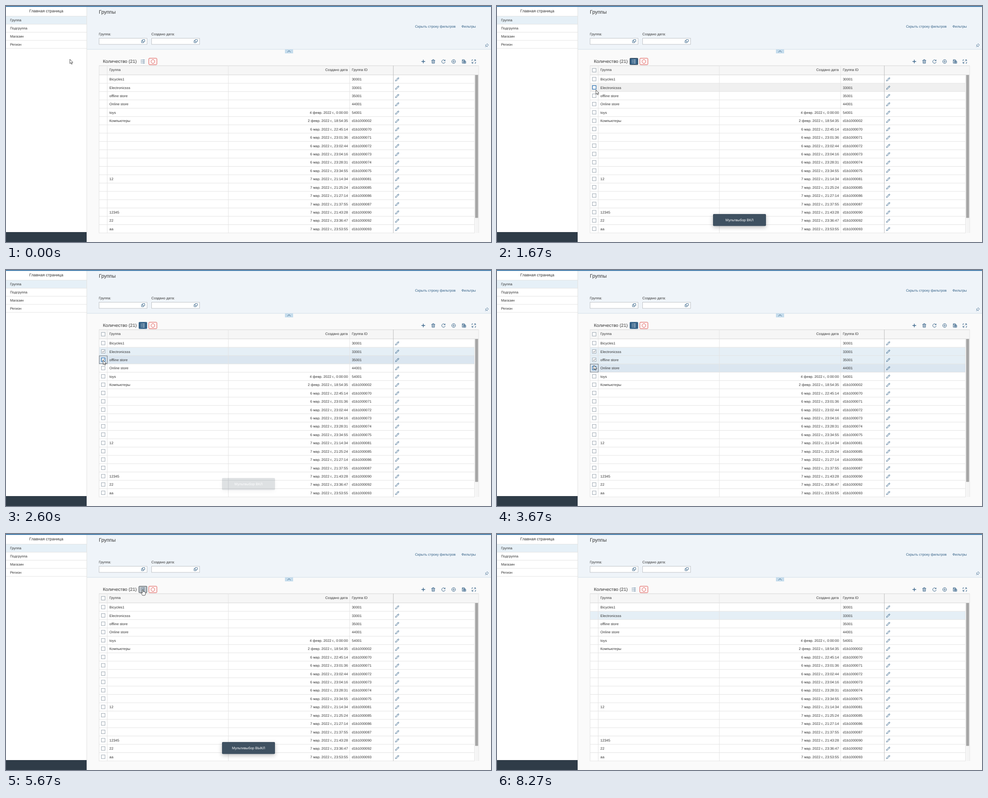
An HTML page that plays this animation: 1071 px wide and 523 px high, repeating every 8470 ms.

```html
<!DOCTYPE html>
<html lang="ru">
<head>
<meta charset="utf-8">
<title>Группы</title>
<style>
html, body { margin: 0; width: 100%; height: 100%; overflow: hidden; background: #fafafa; }
svg { display: block; width: 1071px; height: 523px; }
text { font: 7.82px "Liberation Sans", Arial, sans-serif; fill: #333; text-rendering: geometricPrecision; white-space: pre; }
.end { text-anchor: end; }
.mid { text-anchor: middle; }
.link { fill: #346187; }
.line { stroke: #e3e3e3; fill: none; }
.icon { stroke: #346187; stroke-width: 1; fill: none; }
.box { fill: #fff; stroke: #8f9ba6; stroke-width: .9; }
.box.hot { stroke: #2a6fb0; stroke-width: 1.3; }
.tick { fill: none; stroke: #55616c; stroke-width: 1; }
</style>
</head>
<body>
<svg id="stage" viewBox="0 0 1071 523" xmlns="http://www.w3.org/2000/svg"></svg>
<script>
const LOOP = 8470, STEP = 1000 / 15;
const ROWS = 19, TOP = 153, PITCH = 18.43;

const names = ['Bicycles1', 'Electronicsss', 'offline store', 'Online store', 'toys', 'Компьютеры'];
Object.assign(names, { 12: '12', 16: '12345', 17: '22', 18: 'aa' });
const ids = ['30001', '33001', '35001', '44001', '54001',
  ...['02', '70', '71', '72', '73', '74', '75', '81', '85', '86', '87', '90', '92', '93'].map(n => 'd1b10000' + n)];
const dates = ['', '', '', '', '4 февр. 2022 г., 0:00:00', '2 февр. 2022 г., 18:54:35',
  ...['22:45:14', '23:01:36', '23:02:44', '23:04:16', '23:28:31', '23:34:55'].map(s => '6 мар. 2022 г., ' + s),
  ...['21:14:34', '21:25:24', '21:27:14', '21:37:55', '21:43:28', '23:36:47', '23:53:55'].map(s => '7 мар. 2022 г., ' + s)];

// time, x, y of the pointer tip
const path = [
  [0, 141, 118], [500, 302, 123], [870, 302, 123], [1250, 250, 160], [1660, 218.5, 186], [1740, 218.5, 186],
  [1930, 213.5, 184], [2200, 213.5, 184], [2440, 214.5, 200], [2870, 214.5, 200], [3070, 214, 217.5],
  [3470, 214, 217.5], [3730, 214, 210], [3810, 214, 210], [4000, 214, 202], [4200, 214, 202],
  [4440, 215, 184.5], [4800, 215, 184.5], [5330, 302, 123], [5800, 302, 123], [6260, 219, 182],
  [6810, 219, 182], [7130, 214, 238], [7450, 47, 330], [7930, 734, 512], [8000, 800, 540]
];
// time, value: row index or 'button'
const focus = [[0, null], [600, 'button'], [2060, 1], [2460, 2], [3130, 3], [4060, 2], [4530, 1],
  [5460, 'button'], [6390, 1], [8260, null]];
// row, from, until
const picks = [[1, 2130, 4730], [2, 2530, 4130], [3, 3190, 5530], [1, 6390, LOOP]];
// shown, fade start, text
const toasts = [[600, 1870, 'Мультвыбор ВКЛ'], [5530, 6290, 'Мультивыбор ВЫКЛ']];
const FADE = 1000;

const txt = (x, y, s, cls = '', size = 7.82) =>
  `<text x="${x}" y="${y}" class="${cls}" style="font-size:${size}px">${s}</text>`;
const rect = (x, y, w, h, fill, more = '') =>
  `<rect x="${x}" y="${y}" width="${w}" height="${h}" fill="${fill}" ${more}/>`;
const line = (x1, y1, x2, y2, color = '#e3e3e3') =>
  `<path d="M${x1} ${y1}L${x2} ${y2}" stroke="${color}" fill="none"/>`;
const icon = (x, y, d, more = '') => `<path class="icon" transform="translate(${x} ${y})" d="${d}" ${more}/>`;
const many = (n, f) => Array.from({ length: n }, (_, i) => f(i)).join('');
const rowY = i => TOP + i * PITCH;

function sidebar() {
  return rect(0, 0, 178, 523, '#fff') + rect(0, 22.5, 178, 17.5, '#e6f0f7') +
    txt(89, 14.2, 'Главная страница', 'mid', 8.94) + line(0, 22.5, 178, 22.5) +
    ['Группа', 'Подгруппа', 'Магазин', 'Регион'].map((s, i) =>
      txt(9, 34 + i * 18, s) + line(0, 40.3 + i * 17.9, 178, 40.3 + i * 17.9)).join('') +
    line(178.3, 2, 178.3, 523, '#e0e0e0') + rect(0, 501, 178, 22, '#2f3c48');
}

function field(x, label) {
  return txt(x, 65.4, label, '', 7.82) +
    rect(x + .5, 71.5, 106, 13.5, '#fff', 'stroke="#bfc3c7"') +
    icon(x + 98, 78, 'M-1.5-3.5H3.5V1H-1.5ZM-1.5-1.2H-3.8V3.3H1V1', 'style="stroke-width:.9"');
}

function header() {
  return rect(178.8, 0, 893, 95.5, '#eff4f9') + line(179, 96, 1071, 96, '#cfdde8') +
    txt(205, 17, 'Группы', '', 11.17) + field(205, 'Группа:') + field(321, 'Создано дата:') +
    txt(993, 47.6, 'Скрыть строку фильтров', 'link end') + txt(1037.5, 47.6, 'Фильтры', 'link end') +
    rect(616, 96, 18, 9, '#c5dcec') + icon(625, 100.5, 'M-3.5 1.8L0-1.6L3.5 1.8') +
    icon(1062, 87, 'M.5-3.5L3.5-.5L2.6 0L.6 2L.3 3.4L-3.4-.3L-2-.6L0-2.6ZM-1.6 1.6L-4 4', 'style="stroke-width:.8"');
}

function toolbar() {
  return txt(214, 125.7, 'Количество (21)', '', 10.05) +
    '<rect id="btn" x="293.5" y="115.8" width="17.6" height="14.2" rx="1"/>' +
    icon(302, 123, 'M-.8-3.3H4.4M-.8 0H4.4M-.8 3.3H4.4M-4.3-3.3L-3.5-2.5L-2-4.2M-4.3 0L-3.5.8L-2-.9M-4 3.3H-2.3', 'id="list"') +
    rect(315.5, 115.8, 17.6, 14.2, '#fff', 'stroke="#d9433f" rx="1.5"') +
    icon(324.4, 123, 'M-1.7-4H1.7L4-1.7V1.7L1.7 4H-1.7L-4 1.7V-1.7Z', 'style="stroke:#d9433f"') +
    icon(921.5, 123, 'M-4 0H4M0-4V4', 'style="stroke-width:1.3"') +
    icon(943.5, 123, 'M-4-2.5H4M-1.5-2.7V-4H1.5V-2.7M-3-2.5L-2.6 4H2.6L3-2.5M-1-.8V2.5M1-.8V2.5') +
    icon(966, 123, 'M3.2-2A3.8 3.8 0 1 0 3.8.8M3.7-4V-1.6H1.2') +
    icon(988.5, 123, 'M-1.7-4H1.7L4-1.7V1.7L1.7 4H-1.7L-4 1.7V-1.7ZM1.5 0A1.5 1.5 0 1 1-1.5 0A1.5 1.5 0 1 1 1.5 0') +
    icon(1011, 123, 'M-1.5 3.8H-3.5V-4H1L2.5-2.3V-1M-3.5-2H2M-1-.5H4.2V4H-1ZM-1 1.6H4.2M1.3-.5V4') +
    icon(1033, 123, 'M1-3.8H4V-1M4-3.8L.8-.7M-4 1V3.8H-1M-4 3.8L-.8.7M-4-1V-3.8H-2M4 1V3.8H2');
}

function table() {
  const pencil = 'M-3.8 3.8L-3.1 1.2L1.8-3.5Q2.6-4.1 3.3-3.4Q4-2.6 3.4-1.9L-1.4 3ZM.8-2.5L2.4-.9';
  return rect(205.5, 132.5, 838.5, 370.5, '#fff') + rect(205.5, 132.5, 838.5, 20.5, '#f6f6f6') +
    many(ROWS, i => rect(205.5, rowY(i), 829, PITCH, '#fff', `id="row${i}"`)) +
    many(ROWS, i => line(205.5, rowY(i + 1) - .2, 1034.5, rowY(i + 1) - .2)) +
    line(205, 132.3, 1044, 132.3, '#d6d6d6') + line(205, 152.7, 1044, 152.7, '#d6d6d6') +
    [205.5, 223.5, 491, 759, 1034.5, 1043.8].map(x => line(x, x > 1034 && x < 1040 ? 153 : 132, x, 503)).join('') +
    line(855.3, 132, 855.3, 503, '#bdbdbd') +
    rect(1035.5, 153, 7.5, 350, '#f5f5f5') + rect(1036, 153, 6.5, 316.5, '#a6a6a6') +
    txt(228.3, 144.2, 'Группа') + txt(754.5, 144.2, 'Создано дата', 'end') + txt(763.7, 144.2, 'Группа ID') +
    many(ROWS, i => {
      const y = rowY(i) + 12.1;
      return txt(228.3, y, names[i] || '') + txt(755, y, dates[i], 'end') + txt(763.7, y, ids[i]) +
        icon(864, y - 2.6, pencil, 'style="stroke-width:.9"');
    }) +
    '<g id="checks"><rect class="box" x="210.7" y="138.3" width="8" height="8"/>' +
    many(ROWS, i => {
      const y = rowY(i) + 5;
      return `<rect id="box${i}" class="box" x="210.7" y="${y}" width="8" height="8"/>` +
        `<path id="tick${i}" class="tick" d="M212.4 ${y + 4.2}l1.7 1.8l3.2-3.8"/>`;
    }) + '</g>' +
    '<rect id="cell" x="206" width="17.4" height="17.6" fill="none" stroke="#4a5560" stroke-width=".8"/>';
}

function overlay() {
  return '<g id="toast"><rect x="477" y="461" width="117" height="26.5" rx="2" fill="#3f5161" ' +
    'style="filter:drop-shadow(0 3px 5px rgba(0,0,0,.25))"/>' +
    '<text id="note" class="mid" x="535.5" y="476.9" style="fill:#fff"></text></g>' +
    '<path id="arrow" d="M0 0V9.6L2.2 7.6L3.8 11L5.3 10.3L3.8 7.1H6.7Z" fill="#fff" stroke="#222" stroke-width=".8"/>' +
    '<path id="hand" d="M-1 1Q0-.6 1 1V5Q2 4 2.8 5.2Q3.8 4.4 4.4 5.5Q5.6 5 6 6.4V9Q6 11 4.8 13H-.6Q-2 10.5-3.8 8.2' +
    'Q-3.8 6.5-2.3 7.1L-1 8.4Z" fill="#fff" stroke="#222" stroke-width=".8"/>';
}

const stage = document.getElementById('stage');
stage.innerHTML = rect(0, 0, 1071, 523, '#fafafa') + header() + sidebar() +
  rect(0, 0, 1071, 2, '#427cac') + toolbar() + table() + overlay();

const $ = id => document.getElementById(id);
const show = (id, on) => { $(id).style.display = on ? '' : 'none'; };
const latest = (steps, t) => steps.filter(s => s[0] <= t).pop()[1];

function pointer(t) {
  const k = path.findIndex(p => p[0] > t);
  if (k < 0) return [0, 600];
  const [a, b] = [path[k - 1], path[k]];
  const u = (t - a[0]) / (b[0] - a[0]);
  const e = u * u * (3 - 2 * u);
  return [a[1] + (b[1] - a[1]) * e, a[2] + (b[2] - a[2]) * e];
}

function drawButton(t, over, focused) {
  const on = t >= 600 && t < 5530;
  const fill = on ? (over ? '#2b5273' : '#346187') : over ? (t > 5500 ? '#c4c8cb' : '#e4e8eb') : 'none';
  $('btn').style.fill = fill;
  $('btn').style.stroke = focused ? '#26323c' : on ? '#346187' : 'none';
  $('btn').style.strokeWidth = focused ? .9 : 1;
  $('list').style.stroke = on ? '#fff' : '#346187';
}

function draw(t) {
  const [x, y] = pointer(t);
  const over = x > 293 && x < 312 && y > 115 && y < 131;
  for (const id of ['arrow', 'hand']) $(id).setAttribute('transform', `translate(${x} ${y})`);
  show('arrow', !over);
  show('hand', over);

  const held = latest(focus, t);
  drawButton(t, over, held === 'button');
  show('cell', typeof held === 'number');
  if (typeof held === 'number') $('cell').setAttribute('y', rowY(held) + .3);

  const hot = x > 205 && x < 1034 && y > TOP ? Math.floor((y - TOP) / PITCH) : -1;
  for (let i = 0; i < ROWS; i++) {
    const picked = picks.some(p => p[0] === i && t >= p[1] && t < p[2]);
    $('row' + i).style.fill = picked ? (i === hot ? '#dbe6f0' : '#e5eff6') : i === hot ? '#f0f0f0' : '#fff';
    $('box' + i).classList.toggle('hot', i === hot && x < 224);
    show('tick' + i, picked);
  }
  show('checks', t >= 660 && t < 5730);

  const toast = toasts.find(s => t >= s[0] && t < s[1] + FADE);
  show('toast', toast);
  if (toast) {
    const u = Math.max(0, (t - toast[1]) / FADE);
    $('toast').style.opacity = .5 + .5 * Math.cos(Math.PI * u);
    $('note').textContent = toast[2];
  }
}

const start = performance.now();
function tick(now) {
  const t = Math.max(0, now - start) % LOOP;
  draw(Math.floor((t + 1) / STEP) * STEP);
  requestAnimationFrame(tick);
}
draw(0);
requestAnimationFrame(tick);
</script>
</body>
</html>
```
